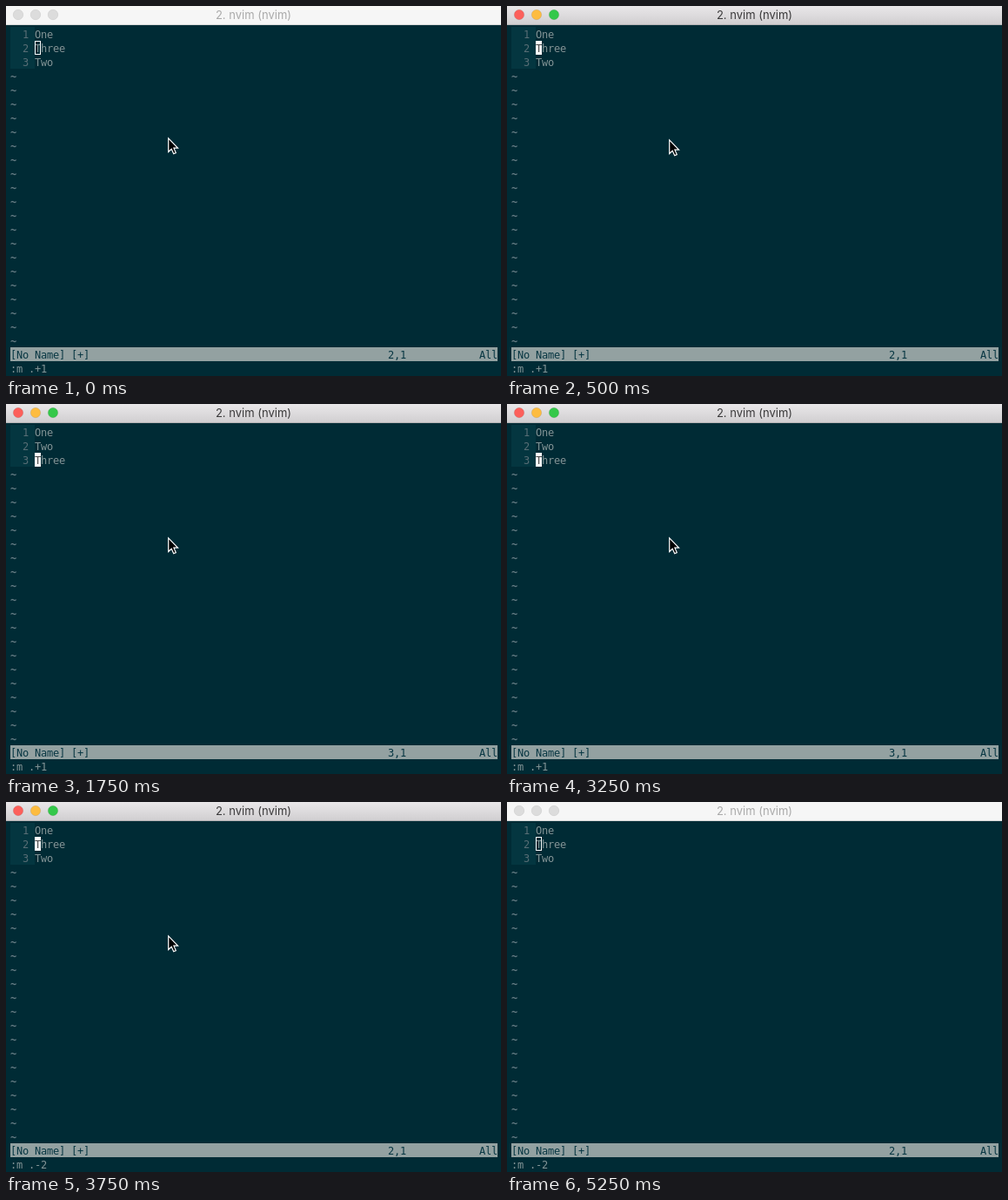
Write an HTML page with a canvas that moves like this. It is 569x425 px and loops after 5750 ms.

```html
<!DOCTYPE html>
<html lang="en">
<head>
<meta charset="utf-8">
<title>Moving lines in nvim</title>
<style>
html, body { margin: 0; width: 100%; height: 100%; overflow: hidden; background: #002b35; }
canvas { display: block; }
</style>
</head>
<body>
<canvas id="stage" width="569" height="425"></canvas>
<script>
const ctx = document.getElementById('stage').getContext('2d');
const LOOP = 5750, LEFT = 5, TOP = 24, CELL_W = 7, CELL_H = 16;
const MONO = '12px "DejaVu Sans Mono", monospace';
const TEXT = '#839496', DARK = '#073642';

// Each state holds from its start time until the next one.
const states = [
  { at: 0,    active: false, row: 1, command: ':m .+1', mouseY: 151 },
  { at: 250,  active: false, row: 1, command: ':m .+1', mouseY: 152 },
  { at: 500,  active: true,  row: 1, command: ':m .+1', mouseY: 153 },
  { at: 1750, active: true,  row: 2, command: ':m .+1', mouseY: 153 },
  { at: 2250, active: true,  row: 1, command: ':m .-2', mouseY: 153 },
  { at: 3250, active: true,  row: 2, command: ':m .+1', mouseY: 153 },
  { at: 3750, active: true,  row: 1, command: ':m .-2', mouseY: 153 },
  { at: 5000, active: true,  row: 1, command: ':m .-2' },
  { at: 5250, active: false, row: 1, command: ':m .-2' }
];

function rect(x, y, w, h, color) {
  ctx.fillStyle = color;
  ctx.fillRect(x, y, w, h);
}

// Terminal text: one character per grid cell.
function print(col, row, text, color, weight = '') {
  ctx.font = weight + ' ' + MONO;
  ctx.textAlign = 'left';
  ctx.fillStyle = color;
  [...text].forEach((char, i) =>
    ctx.fillText(char, LEFT + (col + i) * CELL_W, TOP + row * CELL_H + 13));
}

function drawTitleBar(active) {
  const shade = ctx.createLinearGradient(0, 0, 0, 21);
  shade.addColorStop(0, active ? '#e9e7e9' : '#f6f6f6');
  shade.addColorStop(1, active ? '#d1cfd1' : '#f6f6f6');
  rect(0, 0, 569, 21, shade);
  rect(0, 21, 569, 1, active ? '#b3b1b3' : '#d6d6d6');

  ['#fc605b', '#fdbc40', '#34c84a'].forEach((color, i) => {
    ctx.beginPath();
    ctx.arc(14 + 20 * i, 10, 5.7, 0, Math.PI * 2);
    ctx.fillStyle = active ? color : '#dcdcdc';
    ctx.fill();
    ctx.lineWidth = 0.6;
    ctx.strokeStyle = active ? 'rgba(0,0,0,.15)' : '#cccccc';
    ctx.stroke();
  });

  ctx.font = '13px Inter, sans-serif';
  ctx.textAlign = 'center';
  ctx.fillStyle = active ? '#3b3a3b' : '#aaaaaa';
  ctx.fillText('2. nvim (nvim)', 284.5, 15);
}

function drawCursor(row, active) {
  const x = LEFT + 4 * CELL_W, y = TOP + row * CELL_H;
  if (active) {
    rect(x, y, CELL_W, CELL_H, '#ffffff');
    print(4, row, 'T', '#4a4a4a');
  } else {
    ctx.lineWidth = 1;
    ctx.strokeStyle = '#ffffff';
    ctx.strokeRect(x + 0.5, y + 0.5, CELL_W - 1, CELL_H - 1);
  }
}

function drawMouse(y) {
  ctx.save();
  ctx.translate(186.7, y + 0.9);
  const arrow = new Path2D('M0 0V15.6L3.5 12.3L6 17.8L8.6 16.7L6.2 11.3H10.8Z');
  ctx.fillStyle = '#000000';
  ctx.fill(arrow);
  ctx.lineWidth = 1.2;
  ctx.strokeStyle = '#ffffff';
  ctx.stroke(arrow);
  ctx.restore();
}

function draw({ active, row, command, mouseY }) {
  rect(0, 0, 569, 425, '#002b35');
  drawTitleBar(active);

  rect(LEFT, TOP, 4 * CELL_W, 3 * CELL_H, '#043640');
  const lines = ['One', 'Two'];
  lines.splice(row, 0, 'Three');
  lines.forEach((line, i) => {
    print(2, i, String(i + 1), '#586e75');
    print(4, i, line, TEXT);
  });
  for (let i = 3; i < 23; i++) print(0, i, '~', '#657b83', 'bold');
  drawCursor(row, active);

  rect(LEFT, TOP + 23 * CELL_H, 80 * CELL_W, CELL_H, '#93a1a1');
  print(0, 23, '[No Name] [+]', DARK);
  print(62, 23, `${row + 1},1`, DARK);
  print(77, 23, 'All', DARK);
  print(0, 24, command, TEXT);

  if (mouseY) drawMouse(mouseY);
}

function frame() {
  const time = performance.now() % LOOP;
  draw(states.findLast(state => state.at <= time));
  requestAnimationFrame(frame);
}
frame();
</script>
</body>
</html>
```
